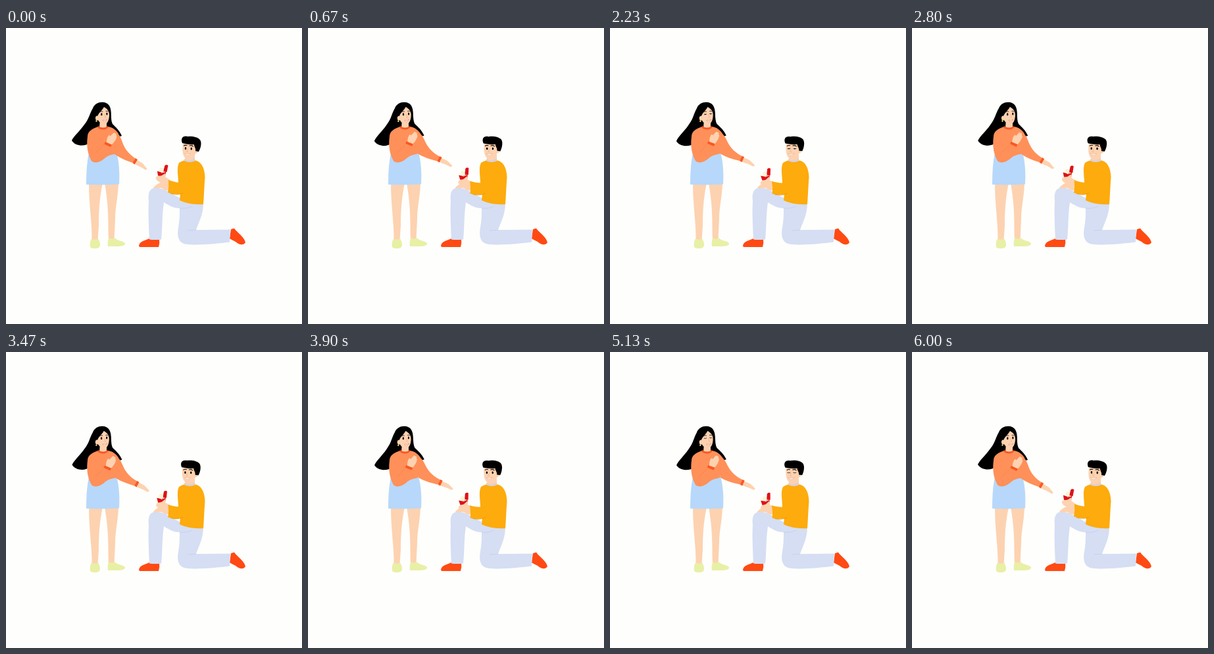
Recreate the animation shown at these times as an HTML page. Size 450 px wide and 450 px high, loop 6030 ms.

```html
<!DOCTYPE html>
<html lang="en">
<head>
<meta charset="utf-8">
<title>Proposal</title>
<style>
  html, body { margin: 0; width: 100%; height: 100%; overflow: hidden; background: #fefefc; }
  svg { display: block; width: 100vw; height: 100vh; }
  .skin { fill: #fdd2b0; }
  .knit { fill: #ff9059; }
  .trim { fill: #fa5724; }
  .lime { fill: #e8f0a6; }
  .gold { fill: #fdab0d; }
  .boot { fill: #ff4a14; }
  .red { fill: #dd1216; }
  .line { fill: none; stroke: #1b1010; stroke-width: .8; stroke-linecap: round; }
  .fold { fill: none; stroke: #ee8248; stroke-width: .6; stroke-linecap: round; }
</style>
</head>
<body>
<svg viewBox="0 0 450 450">
  <!-- woman -->
  <g id="hair">
    <path d="M132 122C136 111 152 110 157 118C162 126 158 138 162 146C167 151 172 155 176 164L150 172L127 174C121 181 105 180 100 171C103 164 112 157 119 147C127 137 127 130 132 122Z"/>
  </g>
  <path class="skin" d="M126 236H147C142 258 141 280 141 300L139.500 323H130.500C131 296 126 270 126 236Z"/>
  <path class="skin" d="M150 236H171C170 260 166 272 166 290L164.500 322H156C155 300 157 275 150 236Z"/>
  <path class="lime" d="M130 320C133 322 137 322 140 320C143 325 144 330 142 333C139 336 131 336 128 333C127 328 128 324 130 320Z"/>
  <path class="lime" d="M156 319C159 321 162 321 165 319C170 324 177 323 181 327C182 331 176 332 168 332H155C154 327 155 323 156 319Z"/>
  <path fill="#b7d8fa" d="M126 190L168 189C172 204 173 221 172 237.500Q146 239 122 238C122 220 123 204 126 190Z"/>
  <path class="skin" d="M143 139H153V152Q148 155 142 151Z"/>
  <g id="reach">
    <path class="skin" d="M195 198C199 201 204 203 208 206L214.500 214Q213 217 210 214.500L204 211C199 209 196 207 193 205Z"/>
    <path class="knit" d="M160 154C169 156 174 164 177 174C181 185 188 193 198 199L194 205.500C183 202 172 197 164 191Z"/>
    <path class="trim" d="M197 198L200 200L195.500 207.500L192.500 205Z"/>
  </g>
  <path class="knit" d="M140 150Q148 155 155 150C162 151 168 155 171 161C172 172 168 182 167 191C161 193 155 193 149 199C142 205 134 206 130 202C124 192 122 178 124 165C124 157 131 153 140 150Z"/>
  <path class="trim" d="M140 149Q148 154 154.500 149L155.500 151.500Q148 157 139.500 152Z"/>
  <g id="chest">
    <path class="skin" d="M153 175C152.500 170 154 166 156 163.500Q158 162 158.500 164.500L163 160Q165 158 165.500 160L167 160.500Q168.500 161 167.500 164L168.500 165Q167 172 159 179Z"/>
    <path class="knit" d="M135 190L150 175L159 180C154 188 147 200 139 204Z"/>
    <path class="trim" d="M151 173L161 177.500L159 181L149.500 176.500Z"/>
    <path class="fold" d="M137 189L149 178"/>
  </g>
  <g id="herFace">
    <ellipse class="skin" cx="138.500" cy="137" rx="2.500" ry="3.500"/>
    <circle cx="137.500" cy="141.500" r="1.200" fill="#f6df62"/>
    <path class="skin" d="M139 135C140 129 146 126 149 120C154 123 157 126 157 132C157 140 154 146 150 146C144 146 139 142 139 135Z"/>
    <path class="line" d="M143 127.500Q145 126 147 127M152 126.500Q154 125.500 155.500 127"/>
    <g class="eye" data-x="145.300" data-y="131.300"><ellipse cx="145.300" cy="131.300" rx="1.200" ry="2"/></g>
    <g class="eye" data-x="153.400" data-y="130.500"><ellipse cx="153.400" cy="130.500" rx="1.100" ry="2"/></g>
    <path class="lid line" d="M143.500 131Q145 132.200 147 131M152 130.500Q153.500 131.700 155 130.500"/>
    <path d="M150 131L151.500 136L149.500 136.500" fill="none" stroke="#efae83" stroke-width=".7"/>
    <path d="M147 140Q151 142 154 139Q152 143.500 148.500 142.500Z" fill="#fff" stroke="#e2705c" stroke-width=".5"/>
  </g>

  <!-- man -->
  <path class="boot" d="M342 306L347 304.500C351 311 362 317 364 326C361 331 355 329.500 351 326.500C347 323 342 322 340 320Z"/>
  <path class="boot" d="M202 331C203 324 212 323 218 320H233Q234 327 232 333H204Q202 333 202 331Z"/>
  <path fill="#d5def3" d="M217 263C215 247 221 241 232 243C246 246 257 256 268 260L300 266C300 284 293 295 289 307L341 306.500L340 325.500C318 328 291 331 273 328.500C261 326 260 315 262 303C264 293 264 284 264 274C254 274 246 269 240 265C237 285 238 303 236 321.500Q226 322.500 218 321.500C217 300 216 280 217 263Z"/>
  <path d="M264 274Q275 275 283 271M289 307L276 308" fill="none" stroke="#c5cfe8" stroke-width=".8"/>
  <path class="skin" d="M249 236L237 234C231 236 225 241 224 243C228 245 235 242 238 244C242 248 246 247 249 246Z"/>
  <path class="skin" d="M272 193H287V204Q279 207 272 203Z"/>
  <path class="gold" d="M263 205C268 202 271 201 273 201Q279 205 286 201C296 202 302 211 302.500 227C301 246 301 256 300 268C286 269 272 266 264 262L265 252L262 235C262 225 259 213 263 205Z"/>
  <path fill="#ddd0d8" d="M271 199Q279 204 287 198L287.500 202Q279 206 271 202Z"/>
  <g id="offer">
    <path class="red" d="M239 218L241.500 209Q244 207 246.500 209L244.500 219Z"/>
    <path d="M231 218L234 212L239 213L240 220H232Z" fill="#fffbe8"/>
    <circle cx="236.500" cy="215" r="1.800" fill="none" stroke="#f6e7a0" stroke-width=".8"/>
    <path class="red" d="M230 217.500L236 219.500L243.500 217.500L242.500 224Q236 227 231 224.500Z"/>
    <path d="M236 220L242 218.800" stroke="#fff3ee" stroke-width="1"/>
    <path class="skin" d="M228 227C231 223 235 226 238 223.500L242 221Q244 223 242 226L249 231L248 240C242 237 233 236 229 231Q227 229 228 227Z"/>
  </g>
  <g id="sleeve">
    <path class="gold" d="M247 231C253 233 259 235 265 235L272 248C267 255 253 253 246 250Q248 241 247 231Z"/>
    <path d="M250 251.500Q261 255 269 251" fill="none" stroke="#ea9500" stroke-width=".8"/>
  </g>
  <g id="hisHead">
    <path class="skin" d="M270 173H287L289 188C287 197 281 200 275 199C268 197 267 184 270 173Z"/>
    <ellipse class="skin" cx="289" cy="187" rx="2.500" ry="3.500"/>
    <path d="M268 175C265 168 269 163 276 165C283 164 291 166 294 169C298 172 297 181 293 188L288 187C289 183 286 181 286 177C280 178 274 176 268 175Z"/>
    <path class="line" style="stroke-width:1.100" d="M270.500 179Q272 177.500 275 178.500M279 179Q282 178 284.500 180"/>
    <g class="eye" data-x="273" data-y="183"><ellipse cx="273" cy="183" rx="1.200" ry="1.900"/></g>
    <g class="eye" data-x="281.800" data-y="183.500"><ellipse cx="281.800" cy="183.500" rx="1.200" ry="1.900"/></g>
    <path class="lid line" d="M271 183Q273 184.300 275 183M280 183.500Q282 184.800 284 183.500"/>
    <path d="M276.500 184L274.500 188L277 188.500" fill="none" stroke="#efae83" stroke-width=".7"/>
    <path d="M271.500 190.500Q276 192.500 281 191Q276 196.500 271.500 190.500Z" fill="#fff" stroke="#dfa58c" stroke-width=".5"/>
  </g>
</svg>
<script>
  const LOOP = 6030, CYCLE = LOOP / 2;
  const BLINK_AT = 2125, BLINK_HALF = 200;
  const part = id => document.getElementById(id);
  const eyes = [...document.querySelectorAll('.eye')];
  const lids = [...document.querySelectorAll('.lid')];

  // joint: [id, degrees at full swing, pivot x, pivot y]
  const joints = [
    ['hair', -2, 148, 128],
    ['herFace', -2, 148, 150],
    ['reach', -10.5, 166, 160],
    ['chest', -6, 137, 200],
    ['offer', -16.5, 273, 226],
    ['sleeve', -8, 270, 244],
    ['hisHead', -5, 279, 202]
  ].map(([id, ...pose]) => [part(id), ...pose]);

  // Steady out and back, with a short rest at full reach
  function swing(t) {
    const tri = 1 - Math.abs(2 * t / CYCLE - 1);
    return Math.min(1, 1.13 * tri);
  }

  function draw(now) {
    const t = now % CYCLE;
    const v = swing(t);
    for (const [el, deg, x, y] of joints) {
      el.setAttribute('transform', `rotate(${deg * v} ${x} ${y})`);
    }
    const shut = Math.max(0, Math.min(1, 1.2 - Math.abs(t - BLINK_AT) / BLINK_HALF));
    for (const eye of eyes) {
      const { x, y } = eye.dataset;
      eye.setAttribute('transform', `translate(${x} ${y}) scale(1 ${1 - shut}) translate(${-x} ${-y})`);
    }
    for (const lid of lids) lid.style.opacity = shut > .6 ? 1 : 0;
  }

  const start = performance.now();
  function tick() {
    draw(performance.now() - start);
    requestAnimationFrame(tick);
  }
  tick();
</script>
</body>
</html>
```
